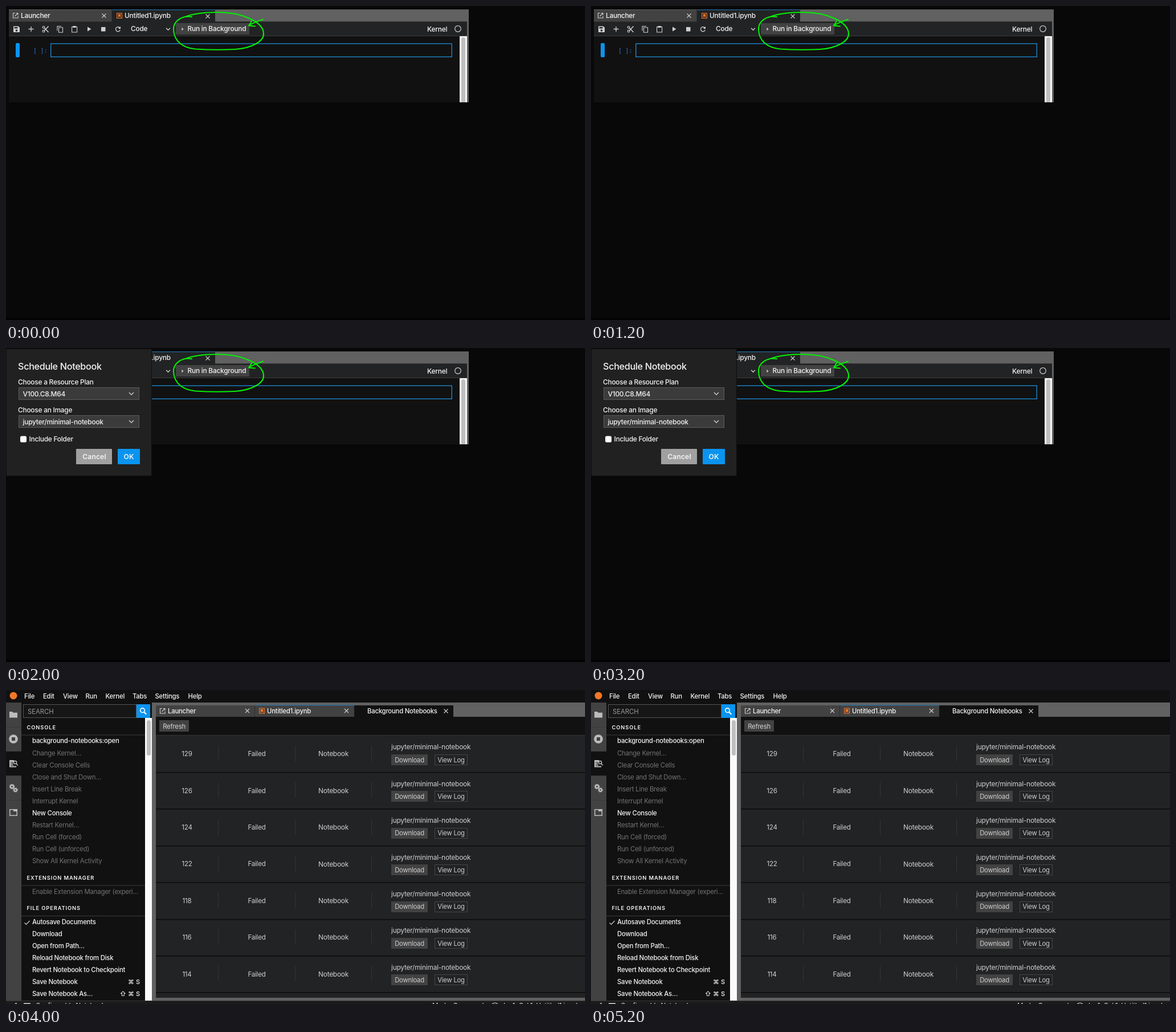
An HTML page with a canvas for the animation above (6000 ms loop, 1016 by 551 pixels).

```html
<!DOCTYPE html>
<html lang="en">
<head>
<meta charset="utf-8">
<title>Background notebooks</title>
<style>
html, body { margin: 0; width: 100%; height: 100%; overflow: hidden; background: #080808; }
canvas { display: block; width: 1016px; height: 551px; }
</style>
</head>
<body>
<canvas id="stage"></canvas>
<script>
const W = 1016, H = 551, LOOP = 6000;
const SANS = 'Inter, "Noto Sans", "DejaVu Sans", sans-serif';
const MONO = '"DejaVu Sans Mono", monospace';
const BLUE = '#0a94ef', GREEN = '#06ee06', BAR = '#616161', TAB = '#424242',
      PANEL = '#222324', DARK = '#111111', ICON = '#d0d0d0', DIM = '#737373';

const canvas = document.getElementById('stage');
const ctx = canvas.getContext('2d');
const dpr = window.devicePixelRatio || 1;
canvas.width = W * dpr;
canvas.height = H * dpr;

function box(x, y, w, h, fill, radius = 0) {
  ctx.fillStyle = fill;
  ctx.beginPath();
  ctx.roundRect(x, y, w, h, radius);
  ctx.fill();
}

function frame(x, y, w, h, color, width = 1) {
  ctx.strokeStyle = color;
  ctx.lineWidth = width;
  ctx.strokeRect(x + width / 2, y + width / 2, w - width, h - width);
}

function stroke(d, color = ICON, width = 1.2) {
  ctx.strokeStyle = color;
  ctx.lineWidth = width;
  ctx.stroke(new Path2D(d));
}

function fill(d, color = ICON) {
  ctx.fillStyle = color;
  ctx.fill(new Path2D(d));
}

function ring(x, y, r, color = ICON, width = 1.2) {
  ctx.strokeStyle = color;
  ctx.lineWidth = width;
  ctx.beginPath();
  ctx.arc(x, y, r, 0, Math.PI * 2);
  ctx.stroke();
}

function disc(x, y, r, color) {
  ctx.fillStyle = color;
  ctx.beginPath();
  ctx.arc(x, y, r, 0, Math.PI * 2);
  ctx.fill();
}

// y is the middle of the capitals
function text(str, x, y, { size = 11.9, color = '#f4f4f4', weight = 500, gap = -0.02 * size,
                           align = 'left', family = SANS } = {}) {
  ctx.font = `${weight} ${size}px ${family}`;
  ctx.letterSpacing = gap + 'px';
  ctx.textAlign = align;
  ctx.fillStyle = color;
  ctx.fillText(str, x, y + size * 0.364);
}

const cross = (x, y) =>
  stroke(`M${x - 3.5} ${y - 3.5}l7 7m0-7l-7 7`, ICON, 1.1);
const chevron = (x, y, s = 3.5) =>
  stroke(`M${x - s} ${y - s / 2}l${s} ${s}l${s} ${-s}`, ICON, 1.3);

function launchIcon(x, y) {
  stroke(`M${x + 4} ${y + .5}h-3.5v8.5h8.5v-3.5M${x + 3.5} ${y + 6}l5.3-5.3M${x + 5.8} ${y + .5}h3.2v3.2`, ICON, 1.1);
}

function bookIcon(x, y) {
  frame(x, y, 10, 10, '#e8702a', 1.2);
  fill(`M${x + 2.8} ${y + 2.2}h4.4v5.8l-2.2-1.8l-2.2 1.8z`, '#f37726');
}

function toolbarIcons() {
  fill('M13 35.5h8.5l2.5 2.5v8h-11z');
  box(14.5, 37, 6, 2.4, PANEL);
  disc(18.5, 43, 1.8, PANEL);
  stroke('M39.5 40.5h9M44 36v9', ICON, 1.3);
  ring(66, 37.3, 1.8);
  ring(66, 44.2, 1.8);
  stroke('M67.5 38.5L74.5 46M67.5 43L74.5 35.5', ICON, 1.5);
  stroke('M90 43.5V35.5h7M92.5 37.8h7v8.4h-7z', ICON, 1.1);
  stroke('M115.6 36.5h9v9.5h-9z', ICON, 1.1);
  box(117.5, 35, 5.2, 3, ICON);
  fill('M143 36.5l6.5 4l-6.5 4z');
  box(167, 37, 7.5, 7.5, ICON);
  stroke('M199.6 38.2A4 4 0 1 0 200.3 42', ICON, 1.3);
  fill('M201 35.8v4.2h-4.2z');
}

function scribble() {
  ctx.lineCap = ctx.lineJoin = 'round';
  stroke('M326 19C307 16 293 28 294 42C295 61 309 73 332 75.5C356 77 382 77 402 76' +
         'C431 74 453 62 452 48C451 28 415 11 372 11C346 11 326 14 311 20', GREEN, 2.1);
  stroke('M451 23.5C442 27 436 28 426 34.5M431 26.5L426 34.5L437 35.5', GREEN, 2.1);
  ctx.lineCap = 'butt';
  ctx.lineJoin = 'miter';
}

function notebook() {
  box(0, 0, W, H, '#080808');
  box(0, 547, W, 4, '#030303');
  box(5, 6, 807, 163, BAR);
  box(5, 7, 180, 20, TAB);
  box(5, 27, 804, 1, '#303030');
  box(185, 6, 1, 22, '#333');
  box(186, 6, 181, 22, PANEL);
  box(186, 6, 181, 1.3, '#246d9f');
  launchIcon(12, 12);
  text('Launcher', 26, 17);
  cross(172, 17);
  bookIcon(194, 12);
  text('Untitled1.ipynb', 208, 17);
  cross(354, 18);

  box(5, 28, 804, 24, PANEL);
  box(5, 52, 804, 1, '#3c3c3c');
  toolbarIcons();
  text('Code', 219, 40);
  chevron(284.5, 40.5);
  box(298, 30, 129, 20, TAB, 1);
  fill('M308.5 37.8l3 2.7l-3 2.7z');
  text('Run in Background', 318.5, 40);
  text('Kernel', 739, 41);
  ring(793, 40, 5.3);

  box(5, 53, 791, 116, DARK);
  box(796, 53, 13, 116, '#f7f7f7');
  box(799, 55, 7, 114, '#bfbfbf', [3.5, 3.5, 0, 0]);
  box(17, 65, 7, 25, BLUE, 2);
  text('[ ]:', 48, 78, { size: 10.2, color: '#2d74d2', weight: 400, gap: 0, family: MONO });
  frame(78, 65.5, 705, 24.5, '#1c85c9', 1.4);
  scribble();
}

function select(label, value, y) {
  text(label, 21, y);
  box(22, y + 9, 212, 22, '#3b3b3b');
  frame(22, y + 9, 212, 22, '#5c5c5c');
  text(value, 29.5, y + 20.5);
  chevron(220, y + 20, 4);
}

function dialog() {
  box(0, 1, 256, 224, '#0d0d0d');
  box(1, 2, 254, 222, '#212121');
  text('Schedule Notebook', 21, 32, { size: 16.2 });
  select('Choose a Resource Plan', 'V100.C8.M64', 60);
  select('Choose an Image', 'jupyter/minimal-notebook', 109);
  box(25, 154.5, 11, 11, '#fff', 2.5);
  text('Include Folder', 40.5, 159.5);
  const label = { size: 12, weight: 600, gap: 0.2, align: 'center' };
  box(123, 177, 63, 27, '#a0a0a0', 1);
  text('Cancel', 155, 190.5, label);
  box(196, 177, 39, 27, BLUE, 1);
  text('OK', 215.5, 190.5, label);
}

const SMALL = { size: 11.35 };
const FADED = { size: 11.4, color: DIM, weight: 400 };

function menuBar() {
  box(0, 0, W, 22, DARK);
  disc(13, 10, 6.5, '#f37726');
  const items = { File: 32, Edit: 65, View: 100, Run: 139.5, Kernel: 174.5, Tabs: 222, Settings: 261.5, Help: 319.5 };
  for (const name in items) text(name, items[name], 11, SMALL);
}

function sideTabs() {
  box(0, 22, 27, 523, TAB);
  box(0, 108, 27, 42, DARK);
  for (const y of [65, 107, 150, 193]) box(0, y, 27, 1, '#383838');
  const c = '#bcbcbc';
  fill('M6 38h5l1.5 1.8H20v8.7H6z', c);
  disc(13, 86, 7.8, c);
  box(10, 83, 6, 6, TAB);
  fill('M6 123h8v3a4 4 0 0 0 4 7v2.5H6z', c);
  stroke('M8 127h4M8 130h4M8 133h6', DARK, 1);
  ring(16, 127, 2.6, c, 1.5);
  stroke('M17.8 129l3 3.3', c, 1.6);
  ring(10.5, 169.5, 2.7, c, 2.2);
  ring(16.5, 175.5, 2.3, c, 2.2);
  ctx.setLineDash([1.5, 1.5]);
  ring(10.5, 169.5, 4.2, c, 1.2);
  ring(16.5, 175.5, 3.7, c, 1.2);
  ctx.setLineDash([]);
  frame(6, 209, 14, 12, c, 1.5);
  box(13, 209, 7, 4, c);
}

function heading(label, y) {
  text(label, 36.5, y, { size: 9.3, weight: 600, gap: 0.9 });
  box(27, y + 13, 217, 1, '#3b3b3b');
}

function palette() {
  box(27, 22, 229, 523, DARK);
  box(30, 25, 199, 24, '#161616');
  frame(30, 25, 199, 24, '#555');
  text('SEARCH', 38, 37.5, { size: 11.3, color: '#9a9a9a', weight: 400, gap: 0 });
  box(229, 25, 24, 24, BLUE);
  ring(239.5, 35.7, 3.8, '#fff', 1.6);
  stroke('M242.3 38.7l4 4', '#fff', 2);

  heading('CONSOLE', 65.5);
  ['background-notebooks:open', 'Change Kernel…', 'Clear Console Cells', 'Close and Shut Down…',
   'Insert Line Break', 'Interrupt Kernel', 'New Console', 'Restart Kernel…', 'Run Cell (forced)',
   'Run Cell (unforced)', 'Show All Kernel Activity'].forEach((name, i) =>
    text(name, 46, 89.3 + i * 21.07, i % 6 ? FADED : SMALL));

  heading('EXTENSION MANAGER', 329.5);
  text('Enable Extension Manager (experi…', 46, 353.5, FADED);

  heading('FILE OPERATIONS', 383);
  ['Autosave Documents', 'Download', 'Open from Path…', 'Reload Notebook from Disk',
   'Revert Notebook to Checkpoint', 'Save Notebook', 'Save Notebook As…'].forEach((name, i) =>
    text(name, 46, 407 + i * 21.05, SMALL));
  stroke('M32.5 408.5l3 3l6-6.5', ICON, 1.2);
  const keys = { size: 11, align: 'right', gap: 0 };
  text('⌘ S', 235, 512, keys);
  text('⇧ ⌘ S', 235, 533, keys);

  box(244, 49, 12, 496, '#fafafa');
  box(247, 53, 7, 62, '#bfbfbf', 3.5);
}

function jobRow(id, i) {
  const y = 112 + i * 64.4;
  const cell = { size: 11.6, color: '#cfcfcf', weight: 400, align: 'center' };
  text(id, 317.5, y, cell);
  text('Failed', 440, y, cell);
  text('Notebook', 574.5, y, { ...cell, size: 11.9 });
  for (const x of [372, 507, 641]) box(x, Math.round(y - 14), 1, 27, '#333435');
  text('jupyter/minimal-notebook', 676, y - 12, { ...cell, size: 11.95, align: 'left' });
  const top = Math.round(y + 1);
  box(676, top, 64, 19, TAB);
  text('Download', 708, y + 10.5, { ...cell, size: 11.3 });
  frame(752, top, 58, 19, '#464646');
  text('View Log', 781, y + 10.5, { ...cell, size: 11.3 });
  box(263, Math.round(y + 32), W - 263, 1.4, '#0b0b0b');
}

function jobs() {
  box(256, 22, W - 256, 523, BAR);
  box(263, 27, 173, 20, TAB);
  box(437, 26, 174, 21, TAB);
  box(437, 26, 174, 1.2, '#2c74a3');
  box(436, 27, 1, 20, '#2e2e2e');
  box(611, 27, 174, 20, DARK);
  launchIcon(270, 32);
  text('Launcher', 284, 36.5, SMALL);
  cross(423.5, 36.5);
  bookIcon(444, 31.5);
  text('Untitled1.ipynb', 458, 36.5, SMALL);
  cross(597.5, 36.5);
  text('Background Notebooks', 634, 36.5, SMALL);
  cross(772, 37);

  box(263, 47, W - 263, 32, DARK);
  box(269, 53, 52, 20, TAB);
  text('Refresh', 295, 63.5, { ...SMALL, color: '#d8d8d8', weight: 400, align: 'center' });
  box(263, 79, W - 263, 461, PANEL);
  box(263, 79, W - 263, 1, '#343434');
  [129, 126, 124, 122, 118, 116, 114].forEach(jobRow);
}

function statusBar() {
  box(0, 545, W, 6, '#1b1b1b');
  box(0, 545, W, 1, '#383838');
  const label = { size: 11.5, color: '#dcdcdc', weight: 400 };
  text('1', 15, 553.5, label);
  box(31, 549.5, 12, 2, '#dcdcdc');
  text('Configurable Notebook', 52, 553.5, label);
  text('Mode: Command', 748, 553.5, label);
  ring(858, 555, 6, '#dcdcdc');
  text('Ln 1, Col 1  Untitled1.ipynb', 873, 553.5, label);
}

function workspace() {
  box(0, 0, W, H, DARK);
  menuBar();
  sideTabs();
  palette();
  jobs();
  statusBar();
}

let start = null;
function draw(now) {
  if (start === null) start = now;
  const t = (now - start) % LOOP;
  ctx.setTransform(dpr, 0, 0, dpr, 0, 0);
  if (t < 4000) {
    notebook();
    if (t >= 2000) dialog();
  } else {
    workspace();
  }
  requestAnimationFrame(draw);
}
requestAnimationFrame(draw);
</script>
</body>
</html>
```
